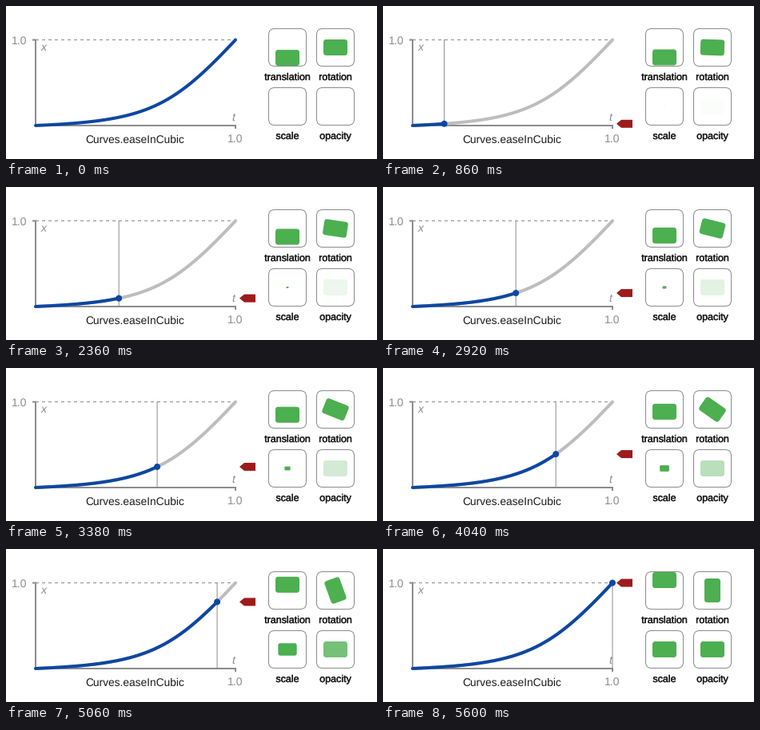
A matplotlib script for the animation above (5620 ms loop, 464 px wide and 192 px high).

```python
import numpy as np
import matplotlib.pyplot as plt
from matplotlib.animation import FuncAnimation
from matplotlib.patches import Circle, FancyBboxPatch, Polygon
from matplotlib.patheffects import withStroke
from matplotlib.transforms import Affine2D

W, H, DPI = 464, 192, 64
PX = 72 / DPI  # points per pixel
STEPS, TICKS, TICK_MS = 120, 281, 20

LEFT, RIGHT, TOP, BOTTOM = 37, 287, 42.5, 150
BLUE, GREEN, RED = "#0d47a1", "#4caf50", "#9e1b1b"
GREY, PALE, INK = "#8c8c8c", "#bdbdbd", "#1a1a1a"

plt.rcParams.update({
    "font.family": "Liberation Sans",
    "text.hinting": "none",
    "path.snap": False,
    "toolbar": "None",
})

fig = plt.figure(figsize=(W / DPI, H / DPI), dpi=DPI, facecolor="white")
ax = fig.add_axes([0, 0, 1, 1])
ax.set_xlim(0, W)
ax.set_ylim(H, 0)
ax.axis("off")

# Cubic Bezier easing (0.55, 0.055, 0.675, 0.19)
s = np.linspace(0, 1, 401)


def bezier(a, b):
    return 3 * a * s * (1 - s) ** 2 + 3 * b * s ** 2 * (1 - s) + s ** 3


CURVE_T, CURVE_V = bezier(0.55, 0.675), bezier(0.055, 0.19)


def ease(t):
    return np.interp(t, CURVE_T, CURVE_V)


def to_px(t, v):
    return LEFT + t * (RIGHT - LEFT), BOTTOM - v * (BOTTOM - TOP)


def line(x, y, color, width, z, **kw):
    return ax.plot(x, y, color=color, lw=width * PX, zorder=z, **kw)[0]


def label(x, y, text, size, color=GREY, bold=0, **kw):
    t = ax.text(x, y, text, size=size * PX, color=color, ha="center",
                va="baseline", zorder=2, **kw)
    if bold:
        t.set_path_effects([withStroke(linewidth=bold * PX, foreground=color)])


def rounded(x, y, w, h, r, **kw):
    style = f"round,pad=0,rounding_size={r}"
    return ax.add_patch(FancyBboxPatch((x, y), w, h, boxstyle=style, **kw))


# Graph
line([LEFT - 4, LEFT, LEFT, RIGHT, RIGHT], [TOP, TOP, BOTTOM, BOTTOM, BOTTOM + 4],
     GREY, 2, 1, solid_joinstyle="miter", solid_capstyle="butt")
line([LEFT, RIGHT], [TOP, TOP], GREY, 1, 1, linestyle=(0, (4, 4)),
     dash_capstyle="butt")
label(17, 48, "1.0", 14)
label(287, 170.5, "1.0", 14)
label(47, 55.5, "x", 14, style="italic")
label(284.5, 144, "t", 14, style="italic")
label(161.5, 172, "Curves.easeInCubic", 13.7, INK)

marker_line = line([], [], GREY, 1, 3)
rest = line(*to_px(CURVE_T, CURVE_V), PALE, 4, 4, solid_capstyle="round")
trail = line([], [], BLUE, 4, 5, solid_capstyle="round", solid_joinstyle="round")
dot = ax.add_patch(Circle((0, 0), 4, fc=BLUE, lw=0, zorder=6))

ARROW = np.array([(292, 0), (298, -5), (312, -5), (312, 5), (298, 5)], float)
arrow = ax.add_patch(Polygon(ARROW, fc=RED, lw=0, zorder=6))

# Sample tiles
CENTERS = {"translation": (352, 52), "rotation": (412, 52),
           "scale": (352, 126), "opacity": (412, 126)}
tiles = {}
for name, (cx, cy) in CENTERS.items():
    tiles[name] = rounded(-15, -10, 30, 20, 3.5, fc=GREEN, lw=0, zorder=2)
    rounded(cx - 23.5, cy - 23.5, 47, 47, 7.5, fc="none", ec=GREY, lw=PX, zorder=3)
    label(cx, cy + 41, name, 12.5, INK, bold=0.4)


def place(name, dy=0.0, angle=0.0, scale=1.0):
    cx, cy = CENTERS[name]
    move = Affine2D().scale(scale).rotate(angle).translate(cx, cy + dy)
    tiles[name].set_transform(move + ax.transData)


def step_at(tick):
    # Three poses every seven ticks, the middle one held for five
    group, r = divmod(tick, 7)
    return 3 * group + (r > 0) + (r > 5)


def update(tick):
    step = step_at(tick)
    t = step / STEPS
    v = ease(t)
    active = step > 0

    end = t if active else 1.0
    done = CURVE_T < end
    trail.set_data(*to_px(np.append(CURVE_T[done], end),
                          np.append(CURVE_V[done], ease(end))))

    x, y = to_px(t, v)
    marker_line.set_data([x, x], [TOP, BOTTOM])
    dot.center = x, y
    arrow.set_xy(ARROW + (0, y))
    for part in (marker_line, rest, dot, arrow):
        part.set_visible(active)

    place("translation", dy=13 - 26 * v)
    place("rotation", angle=v * np.pi / 2)
    place("scale", scale=max(v, 1e-3))
    place("opacity")
    tiles["scale"].set_visible(active)
    tiles["opacity"].set_alpha(float(v))
    return []


anim = FuncAnimation(fig, update, frames=TICKS, interval=TICK_MS,
                     repeat=True, repeat_delay=0, blit=False,
                     init_func=lambda: update(0))
plt.show()
```
